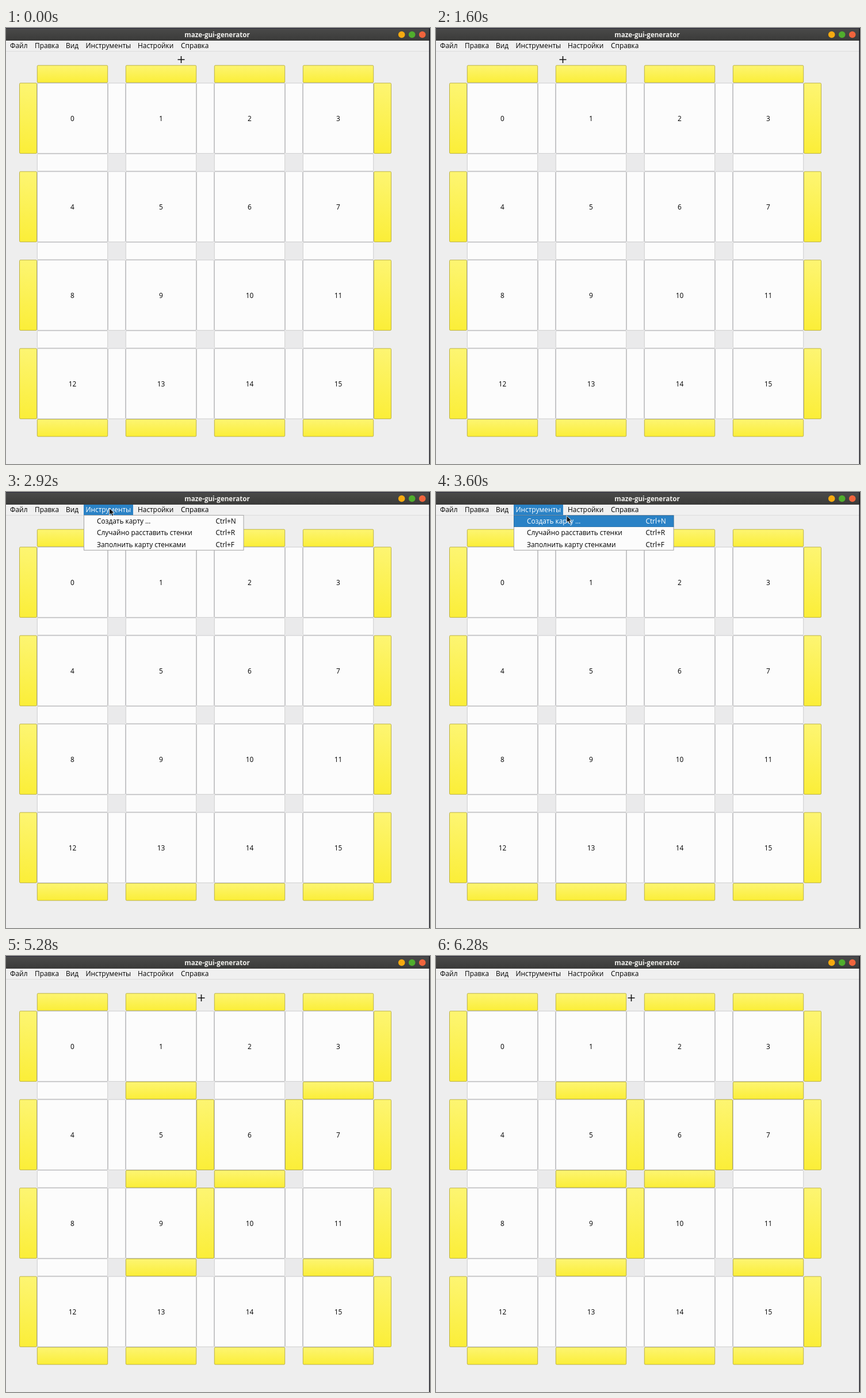
An HTML page for the animation above (6320 ms loop, 737 by 759 pixels).

```html
<!DOCTYPE html>
<html lang="ru">
<head>
<meta charset="utf-8">
<style>
html, body { margin: 0; width: 100%; height: 100%; overflow: hidden; background: #eee; }
svg { display: block; }
text { font: 500 11.9px "Open Sans", "Noto Sans", sans-serif; fill: #000; white-space: pre; }
.title { font-weight: 700; font-size: 11.6px; fill: #f2f1ee; }
.lit { fill: #fff; }
</style>
</head>
<body>
<svg id="stage" width="737" height="759" viewBox="0 0 737 759">
  <defs>
    <linearGradient id="yellow" x2="0" y2="1">
      <stop stop-color="#fdf572"/><stop offset="1" stop-color="#fbee38"/>
    </linearGradient>
    <linearGradient id="bar" x2="0" y2="1">
      <stop stop-color="#4b4b4a"/><stop offset="1" stop-color="#3a3a39"/>
    </linearGradient>
  </defs>
  <rect width="737" height="759" fill="#eee"/>
  <rect width="737" height="22" fill="url(#bar)"/>
  <rect width="737" height="1" fill="#2b2a3c"/>
  <rect y="22" width="736" height="18" fill="#f0f0f0"/>
  <rect y="40" width="736" height="1" fill="#dcdcdc"/>
  <rect x="735.5" y="1" width="1.5" height="758" fill="#15151d"/>
  <text class="title" x="367" y="15.5" text-anchor="middle">maze-gui-generator</text>
  <circle cx="687.7" cy="11.5" r="5.8" fill="#f6aa10"/>
  <circle cx="705.7" cy="11.5" r="5.8" fill="#50ae2d"/>
  <circle cx="723.7" cy="11.5" r="5.8" fill="#f0643d"/>
  <g id="grid"></g>
  <g id="inner"></g>
  <rect id="hot" x="135" y="22" width="86" height="18" fill="#2a82c6"/>
  <g id="bar-text"></g>
  <g id="menu">
    <rect x="135.5" y="40.5" width="277.5" height="60.8" fill="#fcfcfc" stroke="#a2a2a2"/>
    <rect id="pick" x="135.5" width="277.5" height="19.6" fill="#2a82c6" stroke="#226ca6" stroke-width=".8"/>
  </g>
  <path id="cross" d="M-6 0H6M0-6V6" stroke="#111" stroke-width="1.6"/>
  <path id="arrow" d="M0 0V12L3 9.4L5 14L7.4 13L5.4 8.6H9Z" fill="#111" stroke="#fff" stroke-width=".9"/>
</svg>
<script>
const $ = id => document.getElementById(id);
const LOOP = 6320, OPEN = 2200, CLICK = 4840;
const STEP = 154, CELL = 123.2, WALL = 30.8, LINE = .8, LEFT = 53.9, TOP = 95.5;

function add(parent, tag, attrs, content = '') {
  const el = document.createElementNS('http://www.w3.org/2000/svg', tag);
  for (const key in attrs) el.setAttribute(key, attrs[key]);
  el.textContent = content;
  parent.append(el);
  return el;
}

function box(parent, x, y, width, height, fill, stroke) {
  add(parent, 'rect', { x: x + LINE / 2, y: y + LINE / 2, width: width - LINE, height: height - LINE,
    rx: 1.6, fill, stroke, 'stroke-width': LINE });
}

// Wall line 0 lies before the first row or column, line 4 after the last.
function wall(parent, upright, line, place, solid) {
  const across = line * STEP - WALL, along = place * STEP;
  const colours = solid ? ['url(#yellow)', '#aca12f'] : ['#fcfcfc', '#c2c2c4'];
  if (upright) box(parent, LEFT + across, TOP + along, WALL, CELL, ...colours);
  else box(parent, LEFT + along, TOP + across, CELL, WALL, ...colours);
}

for (let line = 1; line < 4; line++)
  for (let k = 1; k < 4; k++)
    add($('grid'), 'rect', { x: LEFT + line * STEP - WALL, y: TOP + k * STEP - WALL,
      width: WALL, height: WALL, rx: 3, fill: '#eaeaeb' });

for (let line = 0; line < 5; line++)
  for (let place = 0; place < 4; place++)
    for (const upright of [true, false])
      wall($('grid'), upright, line, place, line % 4 === 0);

for (let n = 0; n < 16; n++) {
  const x = LEFT + n % 4 * STEP, y = TOP + Math.floor(n / 4) * STEP;
  box($('grid'), x, y, CELL, CELL, '#fcfcfc', '#a8a8aa');
  add($('grid'), 'text', { x: x + CELL / 2, y: y + 66.5, 'text-anchor': 'middle' }, n);
}

for (const [line, place] of [[1, 1], [1, 3], [2, 1], [2, 2], [3, 1], [3, 3]])
  wall($('inner'), false, line, place, true);
for (const [line, place] of [[2, 1], [3, 1], [2, 2]])
  wall($('inner'), true, line, place, true);

const heads = [['Файл', 7], ['Правка', 50], ['Вид', 104], ['Инструменты', 138.5], ['Настройки', 229], ['Справка', 304]]
  .map(([label, x]) => add($('bar-text'), 'text', { x, y: 35 }, label));

const items = [['Создать карту …', 'N'], ['Случайно расставить стенки', 'R'], ['Заполнить карту стенками', 'F']]
  .map(([label, key], i) => [[158, label], [364.5, 'Ctrl+' + key]]
    .map(([x, s]) => add($('menu'), 'text', { x, y: 55 + i * 20.3 }, s)));

// Pointer stops: time, x, y
const path = [[0, 304.5, 55], [1200, 304.5, 55], [1600, 220.5, 55], [2000, 179.5, 28],
  [3240, 179.5, 28], [4240, 339.5, 73], [LOOP, 339.5, 73]];

function pointer(t) {
  const i = path.findIndex(p => p[0] > t);
  const [t0, x0, y0] = path[i - 1], [t1, x1, y1] = path[i];
  const u = (t - t0) / (t1 - t0), e = u * u * (3 - 2 * u);
  return [x0 + (x1 - x0) * e, y0 + (y1 - y0) * e];
}

const show = (id, on) => $(id).setAttribute('visibility', on ? 'visible' : 'hidden');

function draw(t) {
  const [x, y] = pointer(t);
  const open = t >= OPEN && t < CLICK;
  const onBar = y < 40;
  const row = open && y >= 41 ? Math.floor((y - 41) / 20.3) : -1;
  show('menu', open);
  show('hot', open || onBar);
  show('pick', row >= 0);
  show('inner', t >= CLICK);
  show('arrow', open || onBar);
  show('cross', !open && !onBar);
  $('pick').setAttribute('y', 41 + row * 20.3);
  heads[3].classList.toggle('lit', open || onBar);
  items.forEach((pair, i) => pair.forEach(el => el.classList.toggle('lit', i === row)));
  for (const id of ['cross', 'arrow']) $(id).setAttribute('transform', `translate(${x} ${y})`);
}

const start = performance.now();
function frame() {
  draw((performance.now() - start) % LOOP);
  requestAnimationFrame(frame);
}
frame();
</script>
</body>
</html>
```
